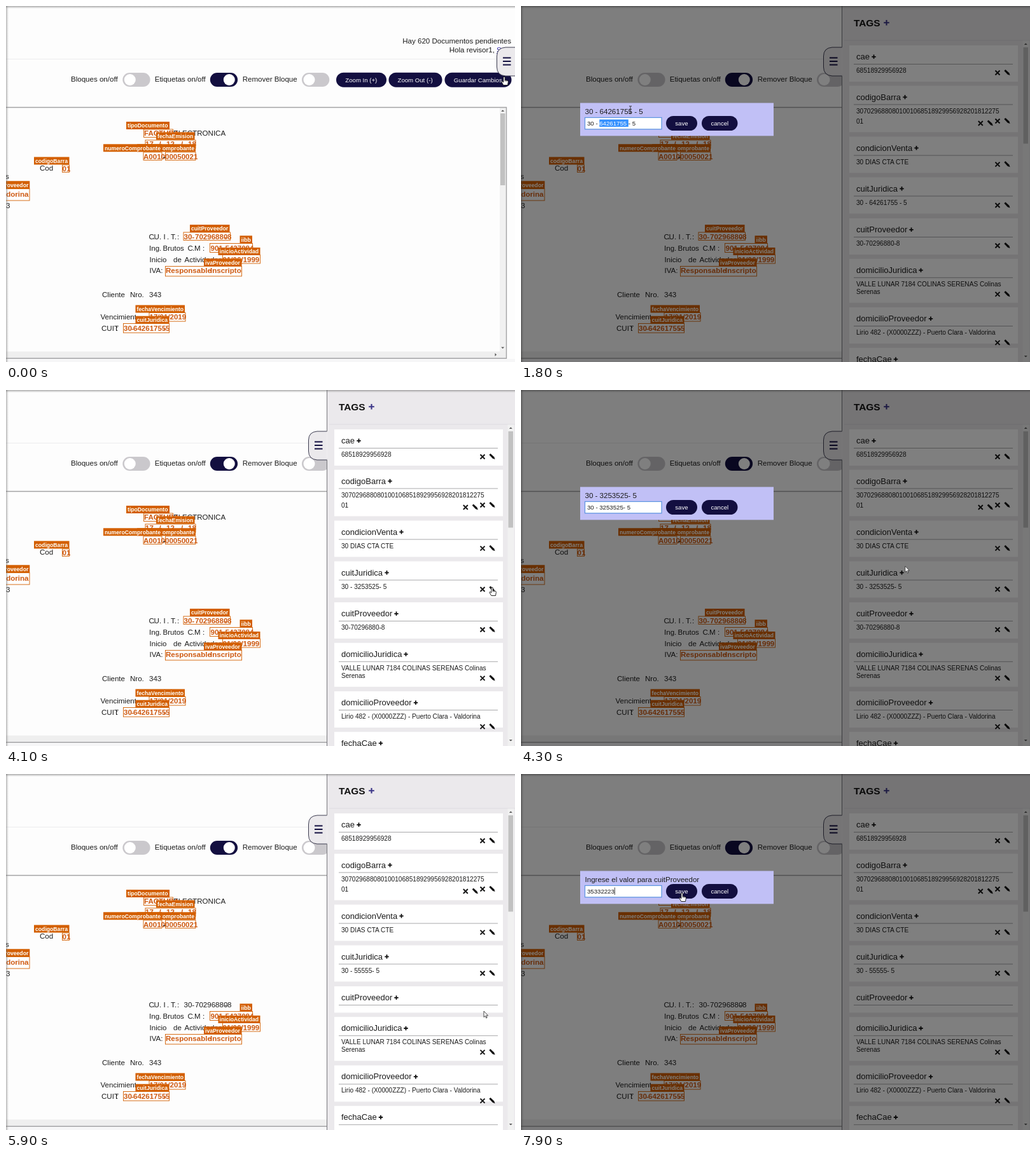
These frames come from a looping animation (800 by 560 pixels, 8000 ms). An HTML page:

```html
<!DOCTYPE html>
<html lang="es">
<head>
<meta charset="utf-8">
<title>Etiquetas</title>
<style>
  html, body { margin: 0; width: 100%; height: 100%; overflow: hidden; background: #fdfdfd; }
  svg { display: block; width: 800px; height: 560px; font-family: "Liberation Sans", Arial, sans-serif; font-size: 11.55px; }
  text { white-space: pre; fill: #1c1c1c; }
  .b { font-weight: bold; }
  .orange { font-weight: bold; fill: #cf5a12; }
  .tag { font-weight: bold; font-size: 8.66px; fill: #fff; }
  .head { font-size: 13px; }
  .value { font-size: 10.1px; }
  .btn { font-size: 9.63px; fill: #fff; }
  .input { font-size: 9.63px; }
</style>
</head>
<body>
<svg id="stage" viewBox="0 0 800 560"></svg>
<script>
const LOOP = 8000, STEP = 100;
const NAVY = '#130f40', PUMPKIN = '#d35f00';
const INPUT_SIZE = 9.63, INPUT_X = 104;

const text = (x, y, s, cls = '', extra = '') => `<text x="${x}" y="${y}" class="${cls}" ${extra}>${s}</text>`;
const rect = (x, y, w, h, fill, extra = '') => `<rect x="${x}" y="${y}" width="${w}" height="${h}" fill="${fill}" ${extra}/>`;
const path = (d, stroke, width = 1, fill = 'none') => `<path d="${d}" stroke="${stroke}" stroke-width="${width}" fill="${fill}"/>`;
const box = (x, y, w, h) => rect(x, y, w, h, 'none', `stroke="${PUMPKIN}" stroke-width=".9"`);
const tag = (x, y, w, s) => rect(x, y, w, 12, PUMPKIN) + text(x + 2, y + 9.2, s, 'tag');
const words = (y, cls, list) => list.map(([x, s]) => text(x, y, s, cls)).join('');
const plus = (x, y, r, color, w) => path(`M${x - r} ${y}h${2 * r}M${x} ${y - r}v${2 * r}`, color, w);
const button = (x, y, w, s, tx) => rect(x, y, w, 23, NAVY, 'rx="11.5"') + text(tx, y + 14.8, s, 'btn');
const toggle = (x, on) => rect(x, 105, 43.3, 22, on ? NAVY : '#cac8cc', 'rx="11"') +
  `<circle cx="${x + (on ? 30 : 11.5)}" cy="116" r="9" fill="#fff"/>`;
const arrow = (x, y, dx, dy) => `<path fill="#555" d="${dy
  ? `M${x - 2.5} ${y - dy}h5l-2.5 ${2.5 * dy}z` : `M${x - dx} ${y - 2.5}v5l${2.5 * dx} -2.5z`}"/>`;
const icons = (x, y) =>
  path(`M${x - 3.5} ${y - 3.5}l7 7m0 -7l-7 7`, '#111', 1.9) +
  `<path transform="translate(${x + 15} ${y - .5})" fill="#111" d="M-4.6 -2.6L-2.6 -4.6L3.2 .8L4.6 4.6L.8 3.2z"/>`;

const topBar = () =>
  rect(0, 0, 800, 560, '#fdfdfd') + path('M0 83.5H800', '#ececee') +
  text(794, 59, 'Hay 620 Documentos pendientes', '', 'text-anchor="end"') +
  text(768, 73, 'Hola revisor1,', '', 'text-anchor="end"') +
  text(771, 73, 'Salir', '', 'style="fill:#3a30b0;text-decoration:underline"') +
  text(102, 119, 'Bloques on/off') + toggle(183.3) +
  text(233.7, 119, 'Etiquetas on/off') + toggle(320.8, true) +
  text(371.7, 119, 'Remover Bloque') + toggle(465) +
  button(519, 104.7, 79, 'Zoom In (+)', 533.3) +
  button(601.5, 104.7, 84, 'Zoom Out (-)', 615.5) +
  button(689.5, 104.7, 105, 'Guardar Cambios', 703.8);

const viewer = () =>
  rect(0, 555, 800, 5, '#f6f6f7') +
  rect(776, 160, 10, 384, '#f1f1f1') + rect(777, 169, 7.5, 113, '#c1c1c1') +
  rect(0, 543.5, 786, 10, '#efefef') +
  arrow(780.7, 165, 0, -1) + arrow(780.7, 537.5, 0, 1) + arrow(769.5, 548.5, 1, 0) +
  path('M0 159.5H786.5V554.2H0', '#a2a2a4', 1.4);

const invoice = () =>
  box(216.5, 194, 46, 12.5) + words(204, 'orange', [[217, 'FACTURA']]) + text(263, 204, 'ELECTRONICA') +
  box(219, 211, 79, 13) + words(221, 'orange', [[219, '17'], [240.5, '/'], [252, '12'], [275, '/'], [286, '18']]) +
  box(216, 230, 29, 12.5) + box(250.5, 230, 47.5, 12.5) +
  words(240.5, 'orange', [[216, 'A0010'], [250, '00050021']]) + text(246.5, 240.5, '-', 'b') +
  text(53, 259, 'Cod') + box(88.5, 250, 11, 11.5) + text(88.5, 260, '01', 'orange') +
  text(-1, 272, 's') + box(-60, 287.5, 97, 18.5) +
  text(35.5, 300, 'Valdorina', 'orange', 'text-anchor="end"') + text(0, 318, '3') +
  words(366.5, '', [[224.5, 'C'], [231, '.'], [232.5, 'U'], [241, '.'], [247.5, 'I'], [253, '.'], [259, 'T'], [265, '.'], [269, ':']]) +
  `<g id="cuit">${words(366.5, '', [[279.5, '30'], [292.3, '-'], [297, '70296880'], [343.3, '-'], [348, '8']])}</g>` +
  words(385, '', [[225, 'Ing'], [241, '.'], [246.5, 'Brutos'], [285.5, 'C'], [293, '.'], [296, 'M'], [309, ':']]) +
  box(320.5, 373.5, 67, 14) + words(385, 'orange', [[321.5, '901'], [341, '-'], [344.5, '5437084']]) +
  words(403, '', [[225.5, 'Inicio'], [263, 'de'], [280.5, 'Actividades']]) +
  box(340.5, 391.5, 59, 13.5) + text(340.5, 403, '01/06/1999', 'orange') +
  text(225.5, 420, 'IVA:') + box(250.5, 409.5, 120, 15.5) +
  words(420, 'orange', [[251, 'Responsable'], [321, 'Inscripto']]) +
  words(458, '', [[151, 'Cliente'], [195, 'Nro.'], [225, '343']]) +
  words(493, '', [[148.5, 'Vencimiento:']]) + rect(204, 482, 21, 12, '#fdfdfd') +
  box(225, 482.5, 57, 13.5) + words(493, 'orange', [[225.5, '17/01/'], [257.5, '2019']]) +
  words(510.5, '', [[150, 'CUIT'], [173, ':']]) + box(184.5, 499.5, 72, 14.5) +
  words(510.5, 'orange', [[185, '30'], [197, '-'], [200, '64261755'], [247.5, '-'], [251, '5']]) +
  tag(189, 182, 68, 'tipoDocumento') + tag(236, 198.5, 60.5, 'fechaEmision') +
  tag(206, 217.3, 92, 'numeroComprobante') + tag(153, 217.3, 92, 'numeroComprobante') +
  tag(44, 237.5, 55.5, 'codigoBarra') +
  rect(-50, 275.3, 87.3, 12, PUMPKIN) + text(35.3, 284.5, 'domicilioProveedor', 'tag', 'text-anchor="end"') +
  `<g id="cuitTag">${box(279, 356, 73.5, 12.5)}${tag(289, 344, 62.5, 'cuitProveedor')}</g>` +
  tag(367.5, 361.3, 19.5, 'iibb') + tag(333.5, 380, 66, 'inicioActividad') +
  tag(311, 397.3, 59.5, 'ivaProveedor') + tag(203.5, 470.5, 77.5, 'fechaVencimiento') +
  tag(203.5, 487.7, 53, 'cuitJuridica');

// x where the plus mark sits, then the value lines with their offsets from the card top
const card = (y, h, name, plusX, lines, iconSpots, id = '') =>
  rect(516, y, 265, h, '#fff', id && `id="${id}Card"`) +
  text(527, y + 22, name, 'head') + plus(plusX, y + 17.8, 3.2, '#111', 1.8) +
  path(`M523 ${y + 29.5}H773`, '#a9a9ab') +
  `<g ${id && `id="${id}"`}>` +
  lines.map(([dy, s]) => text(527, y + dy, s, 'value')).join('') +
  iconSpots.map(([x, dy]) => icons(x, y + dy)).join('') + '</g>';

const panel = () =>
  rect(504.5, -2, 300, 564, '#ebe9ec') +
  path('M504.5 65H489Q475.500 66 475.500 79V96Q475.500 109 489 110H504.5', '#3c3c50', 1, '#ebe9ec') +
  path('M504.5 0V65M504.5 110V560', '#77777c') +
  path('M485 81.500h12.500M485 87h12.500M485 92.500h12.500', NAVY, 1.9) +
  text(523, 31.7, 'TAGS', 'b', 'style="font-size:15.4px;fill:#111"') + plus(574.5, 26.3, 4.3, '#3c3688', 2.1) +
  path('M508 54H800', '#dedce0') +
  rect(788.5, 54.5, 10, 506, '#f1f1f1') + rect(789.5, 65, 7.5, 151.5, '#c1c1c1') +
  arrow(793.3, 60, 0, -1) + arrow(793.3, 551, 0, 1) +
  card(62, 57, 'cae', 554.5, [[42.7, '68518929956928']], [[749, 43]]) +
  card(125.5, 73, 'codigoBarra', 603.5, [[43.3, '3070296880801001068518929956928201812275'], [59.3, '01']], [[722.3, 59], [749, 55.5]]) +
  card(205.5, 57, 'condicionVenta', 621.5, [[43.2, '30 DIAS CTA CTE']], [[749, 43.7]]) +
  card(269.5, 57, 'cuitJuridica', 598.5, [[43.3, '30 - 64261755 - 5']], [[749, 44]], 'juridica') +
  card(334, 57, 'cuitProveedor', 613.5, [[43, '30-70296880-8']], [[749, 43]], 'proveedor') +
  '<g id="below">' +
  card(397.8, 69, 'domicilioJuridica', 628.5, [[43.2, 'VALLE LUNAR 7184 COLINAS SERENAS Colinas'], [55.3, 'Serenas']], [[749, 55.500]]) +
  card(474, 57, 'domicilioProveedor', 644, [[43, 'Lirio 482 - (X0000ZZZ) - Puerto Clara - Valdorina']], [[749, 55.7]]) +
  card(537.8, 57, 'fechaCae', 589, [], []) + '</g>';

const edges = () =>
  `<defs><linearGradient id="down" x2="0" y2="1"><stop stop-color="#777" stop-opacity=".6"/><stop offset="1" stop-color="#777" stop-opacity="0"/></linearGradient>
  <linearGradient id="across"><stop stop-color="#777" stop-opacity=".5"/><stop offset="1" stop-color="#777" stop-opacity="0"/></linearGradient></defs>` +
  rect(0, 0, 800, 4, 'url(#down)') + rect(0, 0, 4, 560, 'url(#across)');

const modal = () =>
  rect(0, 0, 800, 560, '#000', 'opacity=".5"') + rect(93, 152.500, 304, 51.800, '#c1c0f6') +
  text(100.500, 170, '', '', 'id="title"') +
  rect(100.500, 175.500, 120.500, 18.300, '#fff', 'stroke="#5b93e0" stroke-width="1.2"') +
  rect(0, 178.500, 0, 11.500, '#3390ff', 'id="selection"') +
  `<text x="${INPUT_X}" y="187.800" class="input"><tspan id="before"></tspan><tspan id="middle"></tspan><tspan id="after"></tspan></text>` +
  rect(0, 178.500, .8, 11.500, '#111', 'id="caret"') +
  button(228, 173, 49, 'save', 242.300) + button(284, 173, 56.500, 'cancel', 298.400);

const cursors = () =>
  `<g id="hand">${path('M-1.200 1Q0 -.8 1.200 1V5.500L5 6.200Q6.500 6.600 6.300 8.500L5.500 13.500H-1.200L-4 8.800Q-4.200 7.300 -2.800 7.600L-1.200 9z', '#111', .9, '#fff')}${path('M1.200 5.500v2M3.200 6v2', '#111', .7)}</g>` +
  `<g id="pointer">${path('M0 0V9.500L2.200 7.500L3.700 11L5.200 10.300L3.700 7H6.600z', '#222', .8, '#fff')}</g>` +
  `<g id="beam">${path('M-2 -5.500H-.5L0 -5L.5 -5.500H2M0 -5V5M-2 5.500H-.5L0 5L.5 5.500H2', '#222', .9)}</g>`;

const stage = document.getElementById('stage');
stage.innerHTML = topBar() + viewer() + invoice() + `<g id="panel">${panel()}</g>` + edges() +
  `<g id="modal">${modal()}</g><g id="cursor">${cursors()}</g>`;

const $ = id => document.getElementById(id);
const show = (id, on) => $(id).setAttribute('display', on ? 'inline' : 'none');
const set = (id, name, v) => $(id).setAttribute(name, v);
const smooth = u => u * u * (3 - 2 * u);
const clamp = u => Math.max(0, Math.min(1, u));
const inputWidth = s => [...s].reduce((w, c) => w + (c === ' ' ? .278 : c === '-' ? .333 : .556), 0) * INPUT_SIZE;

const moves = [
  [0, 783, 111, 'hand'], [200, 787, 84, 'hand'], [500, 787, 84, 'pointer'], [800, 767, 313, 'hand'],
  [1100, 767, 313, 'pointer'], [1500, 146, 183, 'beam'], [1700, 146, 183, 'beam'], [1800, 172, 163, 'beam'],
  [2500, 172, 163, 'beam'], [2800, 256, 184, 'hand'], [3000, 256, 184, 'pointer'], [3500, 764, 310, 'hand'],
  [4200, 764, 310, 'pointer'], [4500, 146, 183, 'beam'], [4700, 146, 183, 'beam'], [5000, 257, 184, 'hand'],
  [5300, 257, 184, 'pointer'], [5600, 749, 372, 'hand'], [5800, 751, 373, 'pointer'], [5900, 751, 373, 'pointer'],
  [6300, 612, 348, 'hand'], [6500, 612, 348, 'pointer'], [6800, 150, 183, 'beam'], [7400, 150, 183, 'beam'],
  [7700, 253, 187, 'hand'], [LOOP, 253, 187, 'hand']
];

const dialogs = [
  { open: 1100, close: 3000, title: '30 - 64261755 - 5', before: '30 - ', old: '64261755 ', after: '- 5', select: 1600, type: 2000, pace: 100, typed: '3253525' },
  { open: 4200, close: 5300, title: '30 - 3253525- 5', before: '30 - ', old: '3253525', after: '- 5', select: 4500, type: 4600, pace: 100, typed: '55555' },
  { open: 6500, close: LOOP, title: 'Ingrese el valor para cuitProveedor', before: '', old: '', after: '', select: 6500, type: 6900, pace: 80, typed: '35332223' }
];

function drawDialog(t) {
  const d = dialogs.find(d => t >= d.open && t < d.close);
  show('modal', d);
  if (!d) return;
  const typing = t >= d.type;
  const middle = typing ? d.typed.slice(0, Math.floor((t - d.type) / d.pace) + 1) : d.old;
  const selected = !typing && t >= d.select && d.old !== '';
  const start = INPUT_X + inputWidth(d.before), width = inputWidth(middle);
  $('title').textContent = d.title;
  $('before').textContent = d.before;
  $('middle').textContent = middle;
  $('after').textContent = d.after;
  $('middle').style.fill = selected ? '#fff' : '';
  set('selection', 'x', start);
  set('selection', 'width', selected ? width : 0);
  set('caret', 'x', start + width);
  show('caret', t >= d.select && !selected);
}

function drawCursor(t) {
  const i = moves.findIndex((m, k) => t >= m[0] && t < moves[k + 1][0]);
  const [t0, x0, y0, kind] = moves[i], [t1, x1, y1] = moves[i + 1];
  const u = smooth((t - t0) / (t1 - t0));
  set('cursor', 'transform', `translate(${x0 + (x1 - x0) * u} ${y0 + (y1 - y0) * u})`);
  ['hand', 'pointer', 'beam'].forEach(k => show(k, k === kind));
}

function draw(t) {
  set('panel', 'transform', `translate(${296 * (1 - smooth(clamp((t - 200) / 500)))} 0)`);
  $('juridica').querySelector('text').textContent =
    t < 3000 ? '30 - 64261755 - 5' : t < 5300 ? '30 - 3253525- 5' : '30 - 55555- 5';
  const removed = t >= 5800;
  show('proveedor', !removed);
  show('cuitTag', !removed);
  set('cuit', 'font-weight', removed ? 'normal' : 'bold');
  $('cuit').querySelectorAll('text').forEach(e => e.style.fill = removed ? '' : '#cf5a12');
  set('proveedorCard', 'height', removed ? 41.4 : 57);
  set('below', 'transform', `translate(0 ${removed ? -15.6 : 0})`);
  drawDialog(t);
  drawCursor(t);
}

const begin = performance.now();
function tick() {
  const t = (performance.now() - begin) % LOOP;
  draw(Math.floor(t / STEP) * STEP);
  requestAnimationFrame(tick);
}
draw(0);
requestAnimationFrame(tick);
</script>
</body>
</html>
```
